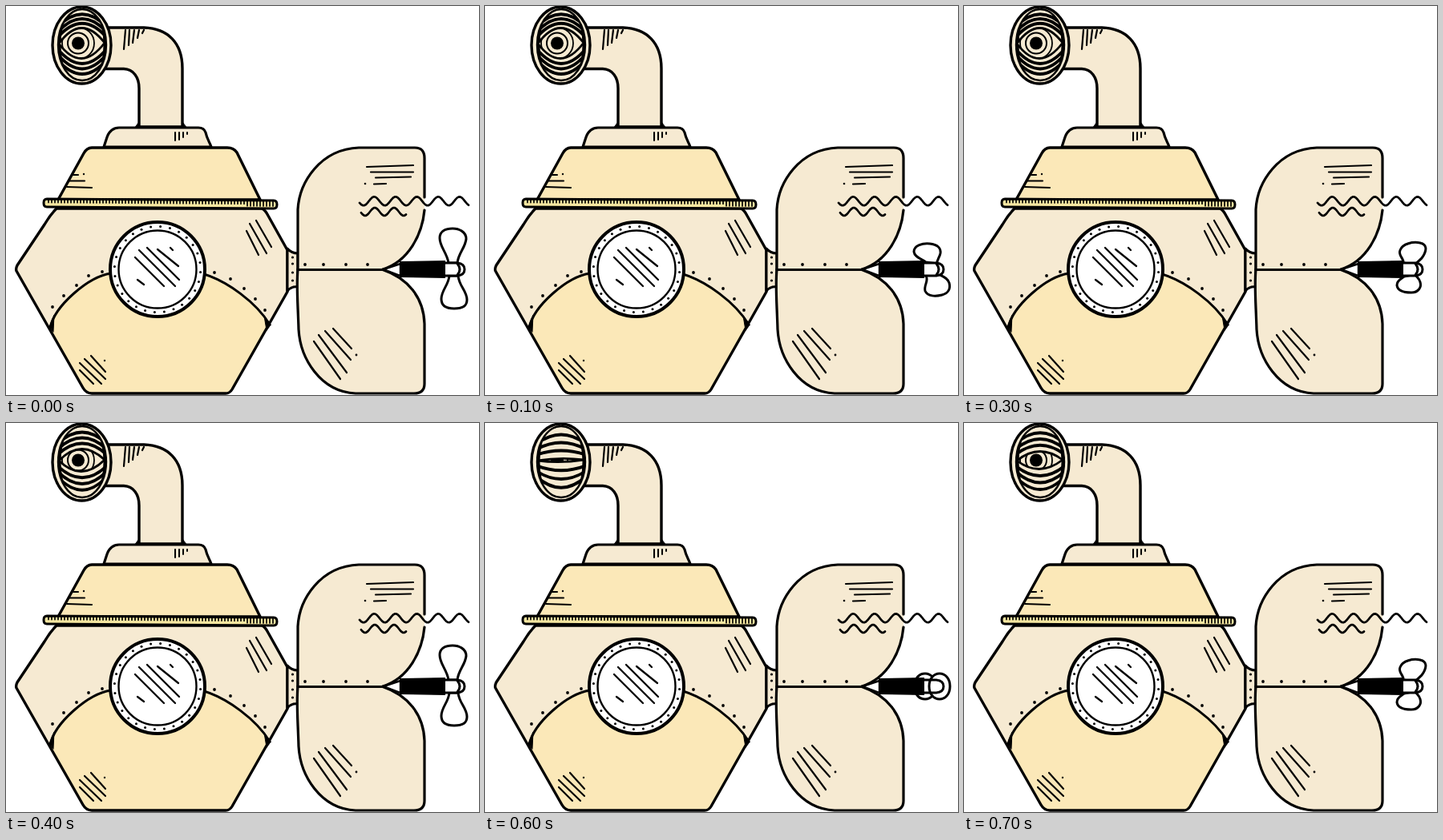
An HTML page for the animation above (800 ms loop, 590 by 486 pixels).

```html
<!DOCTYPE html>
<html lang="en">
<head>
<meta charset="utf-8">
<title>Submarine</title>
<style>
html, body { margin: 0; width: 100%; height: 100%; overflow: hidden; background: #fff; }
svg { display: block; width: 590px; height: 486px; }
path, ellipse, circle { stroke-linecap: round; stroke-linejoin: round; }
</style>
</head>
<body>
<svg id="stage" viewBox="0 0 590 486" xmlns="http://www.w3.org/2000/svg">
  <defs>
    <clipPath id="lens"><ellipse cx="95" cy="48.5" rx="30" ry="44.5"/></clipPath>
    <clipPath id="lids"><path id="lidClip"/></clipPath>
  </defs>
  <g id="body"></g>
  <g clip-path="url(#lens)" fill="none" stroke="#000">
    <path d="M65 48.5a30 44.500 0 1 0 60 0a30 44.500 0 1 0-60 0M68.500 48.500a26.500 52 0 1 1 53 0a26.500 52 0 1 1-53 0" fill="#000" fill-rule="evenodd" stroke="none"/>
    <path id="bands" stroke-width="3.8"/>
    <path id="lid" fill="#f6ead2" stroke-width="2.8"/>
    <g clip-path="url(#lids)">
      <circle cx="90" cy="46.5" r="20" stroke-width="1.8"/>
      <circle cx="90" cy="46.5" r="13" stroke-width="2"/>
      <circle cx="90" cy="46.5" r="8" fill="#000" stroke="none"/>
    </g>
  </g>
  <ellipse cx="95" cy="48.5" rx="30" ry="44.5" fill="none" stroke="#000" stroke-width="2.4"/>
  <g fill="#fff" stroke="#000" stroke-width="3">
    <path id="blades"/>
    <path d="M471 329L492 322V337Z" stroke-width="2.4"/>
    <path d="M491 319L548 318V340L491 339Z" fill="#000" stroke="none"/>
    <path id="hub"/>
  </g>
</svg>
<script>
const $ = id => document.getElementById(id);
const NS = "http://www.w3.org/2000/svg";
const CREAM = "#f6ead2", YELLOW = "#fbe8b8", body = $("body");

function add(tag, attrs) {
  const el = document.createElementNS(NS, tag);
  for (const k in attrs) el.setAttribute(k, attrs[k]);
  body.append(el);
}
const shape = (d, fill, width = 3.2) =>
  add("path", { d, fill, stroke: width ? "#000" : "none", "stroke-width": width });
const line = (d, width = 2.2) => shape(d, "none", width);
const dot = (x, y, r = 1.9) => add("circle", { cx: x, cy: y, r });
const dots = (list, r) => list.forEach(([x, y]) => dot(x, y, r));

// a smooth run of equal waves, starting in a trough
function wave(x0, x1, mid, amp, period) {
  let d = "";
  for (let x = x0; x <= x1; x += 2)
    d += `${d ? "L" : "M"}${x} ${(mid + amp * Math.cos((x - x0 - 5) * 2 * Math.PI / period)).toFixed(1)}`;
  line(d, 2.7);
}

// periscope
shape("M126 27H172C202 28 220 46 220 78V151H166V103C166 89 159 79 147 78.500H122Z", CREAM, 3.4);
add("ellipse", { cx: 94.5, cy: 49, rx: 36.5, ry: 48, fill: CREAM, stroke: "#000", "stroke-width": 3.4 });
line("M149 30L147 54M154 30L153 49M160 30L158 46M166 30L164 40M172 30L170 34");
shape("M122 176C126 165 126 160 132 155Q136 152 141 152H240Q247 152 249 158C251 167 254 170 256 176Z", CREAM);
shape("M166 145V152H161ZM220 145V152H225Z", "#000", 1);
line("M211 158V168M216 158V167M221 158V164M226 158V160", 2);

// upper hull
shape("M107 177H276Q284 177 288 183L317 242H65L97 184Q101 177 107 177Z", YELLOW, 3.4);
line("M82 211H90M79 218.500H98M76 226L107 227");
dot(97, 210, 1.2);

// main hull
const hull = "M63 253Q55 261 48 273L14 324Q12 328 13 331L96 477Q100 484 107 484H274Q279 484 282 479L351 357V305L327 262Q323 254 319 253Z";
const arcs = "M55 402C61 374 103 338 131 334";
shape(hull, CREAM, 0);
shape(arcs + "L247 335C276 344 312 370 329 398L282 479Q279 484 274 484H107Q100 484 96 477Z", YELLOW, 0);
line(hull, 3.4);
line(arcs + "M247 335C276 344 312 370 329 398", 3);
shape("M54 401L60 386L59 407ZM330 398L322 387L325 405Z", "#000", 1);
dots([[58, 376], [72, 362], [88, 349], [103, 337], [120, 332],
      [260, 333], [280, 341], [297, 353], [311, 366], [323, 380]]);
line("M300 281L315 311M304 272L325 309M312 268L331 301");
line("M92 446L119 472M98 441L124 466M92 455L109 472M106 437L124 457");
dot(123, 443, 1.2);

// ring
shape("M51 241L334 243Q338 243 338 248T334 253L51 251Q47 251 47 246T51 241Z", "#f5e6a0", 3);
let ticks = "";
for (let x = 53; x < 335; x += 4) {
  const y = 241 + (x - 51) / 141;
  ticks += `M${x} ${y}v${x > 297 ? 7 : 4.5}`;
}
line(ticks, 1.7);

// porthole
add("circle", { cx: 189, cy: 329, r: 59, fill: "#fff", stroke: "#000", "stroke-width": 4 });
add("circle", { cx: 189, cy: 329, r: 48.5, fill: "#fff", stroke: "#000", "stroke-width": 2.4 });
for (let i = 0; i < 28; i++) {
  const a = (i + 0.3) * Math.PI / 14;
  dot(189 + 53.7 * Math.cos(a), 329 + 53.7 * Math.sin(a), 1.5);
}
line("M189 304L215 325M176 302L216 342M166 305L211 350M161 314L197 350M164 342L172 348M205 302L208 305", 2.3);

// neck
shape("M351 303Q356 309 364 309V351Q356 350 351 356Z", CREAM, 3);
dots([[357.5, 314], [357.5, 322], [357.5, 333], [357.5, 343]], 1.6);

// fins
const topFin = "M364 329V254C366 220 392 179 440 177H510Q522 177 522 190V239";
const lowFin = "M364 329C362 350 364 370 365 404C367 440 392 482 436 484H509Q522 484 522 472V397C521 364 501 340 470 329.500";
shape(topFin + "L522 255C519 286 502 319 470 329Z", CREAM, 0);
shape(lowFin + "Z", CREAM, 0);
line(topFin + "M522 255C519 286 502 319 470 329", 3.2);
line(lowFin + "M364 329.500H472", 3.2);
dots([[373, 323], [396, 323], [424, 323], [451, 323]]);
line("M450 201L508 199M455 207.500H508M461 214.500L505 213.500M459 222.500L474 222");
dot(448, 222, 1.3);
line("M408 403L431 428M398 406L430 442M390 411L425 458M384 419L417 466");
dot(437, 436, 1.4);

// waves
wave(441, 578, 243.8, 5.5, 26.6);
wave(443, 500, 257, 5, 24);

const HUB = "M548 321H563Q572 322 572 329T563 337H548";
const SPLIT = HUB + "M563 322Q569 329 563 336";
// one half turn in quarter steps; in the third pose the blades are seen end on
const POSES = [
  ["M552 321C550 308 541 301 541 290C541 281 549 278 557 278S574 282 574 291C573 302 564 309 563 321Z" +
   "M553 337C552 349 543 355 543 366C543 375 550 378 559 378S575 376 575 367C575 356 565 350 564 337Z", SPLIT],
  ["M550 320C546 316 536 315 535 307C535 299 546 296 555 297S569 302 568 309C567 315 563 317 564 322Z" +
   "M550 337C554 343 547 349 549 356C552 363 562 363 570 361S581 353 579 346C577 338 567 337 563 333Z", SPLIT],
  ["M536 329C536 318 542 313 549 313S562 319 562 329S556 345 549 345S536 340 536 329Z",
   HUB + "M554 329C554 319 560 313 567 313S580 319 580 329S574 345 567 345S554 339 554 329Z"],
  ["M548 321C549 315 541 312 544 305C547 297 560 294 569 296S577 305 573 312C570 318 566 318 563 323Z" +
   "M549 338C546 341 540 342 540 349C541 356 549 358 558 358S571 351 569 345C568 340 564 339 563 335Z", SPLIT]
];
const OPEN = [19, 19, 19, 19, 14, 8, 2, 11];

function drawEye(h) {
  const lid = `M66 47Q94 ${46.5 - 2 * h} 123 46Q94 ${46.5 + 2 * h} 66 47Z`;
  $("lid").setAttribute("d", lid);
  $("lidClip").setAttribute("d", lid);
  let d = "";
  for (const [sign, reach] of [[-1, 42], [1, 45]]) {
    for (const k of [0.25, 0.5, 0.75]) {
      const side = 27 * k, apex = h + (reach - h) * k;
      const y = 46.5 + sign * side, peak = 46.5 + sign * (2 * apex - side);
      d += `M64 ${y}Q95 ${peak} 126 ${y}`;
    }
  }
  $("bands").setAttribute("d", d);
}

let last = -1;
function frame(now) {
  const step = Math.floor(now / 100) % 8;
  if (step !== last) {
    last = step;
    drawEye(OPEN[step]);
    const [blades, hub] = POSES[step % 4];
    $("blades").setAttribute("d", blades);
    $("hub").setAttribute("d", hub);
  }
  requestAnimationFrame(frame);
}
frame(0);
</script>
</body>
</html>
```
